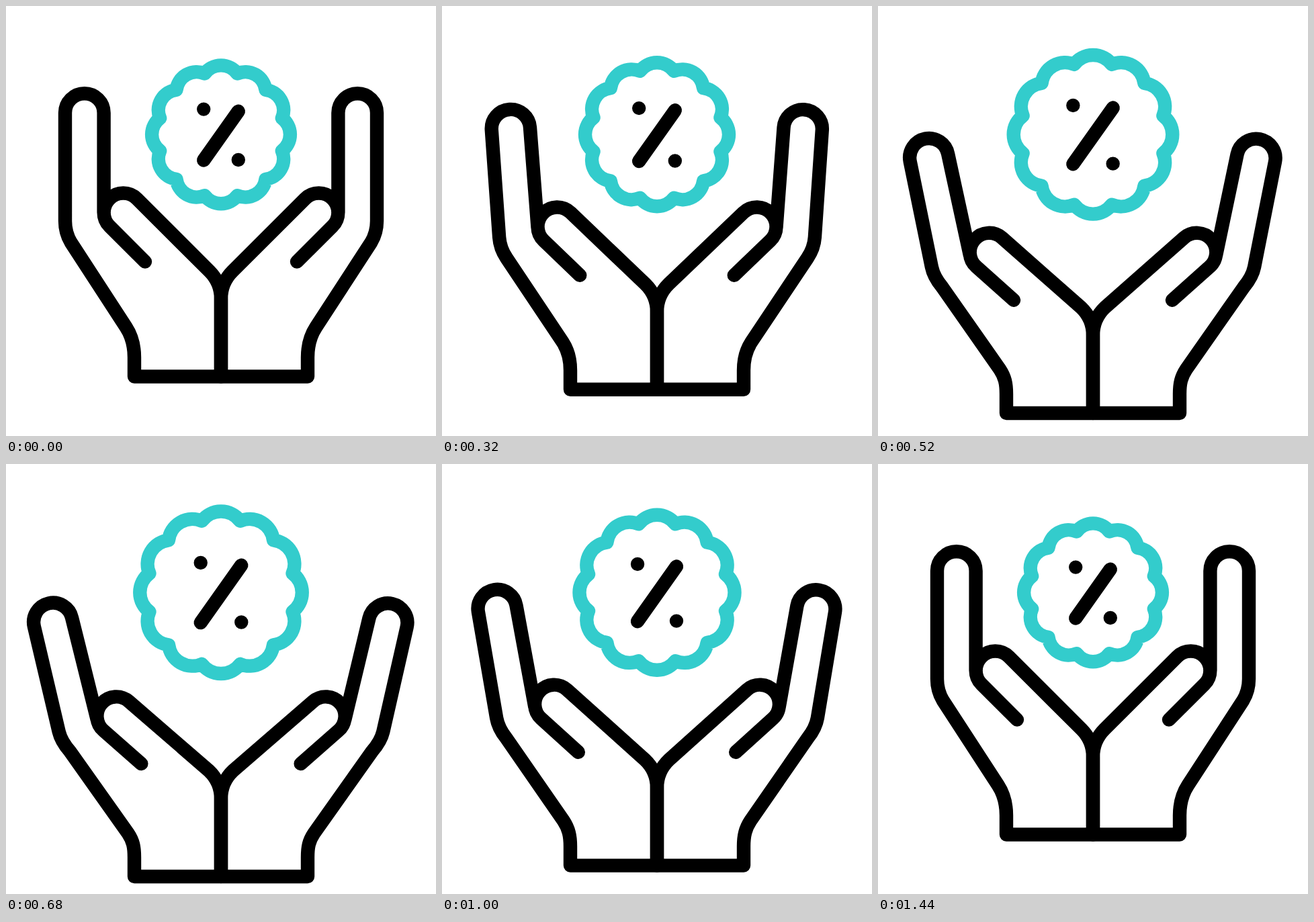
Animation, 640 px wide and 640 px high, one loop 1.52 s. Source, as an HTML page:

```html
<!DOCTYPE html>
<html lang="en">
<head>
<meta charset="utf-8">
<title>Hands and discount badge</title>
<style>
  html, body { margin: 0; width: 100%; height: 100%; overflow: hidden; background: #fff; }
  svg { display: block; width: 100%; height: 100%; }
  path { fill: none; stroke: #000; stroke-width: 20.4; stroke-linecap: round; stroke-linejoin: round; }
  #badge { stroke: #3cc; }
</style>
</head>
<body>
<svg viewBox="0 0 640 640">
  <path id="left"/>
  <path id="right" transform="matrix(-1 0 0 1 640 0)"/>
  <path id="badge"/>
  <path id="percent"/>
</svg>
<script>
const LOOP = 1520, STEP = 40, PEAK = 720;
const CX = 320, CY = 191.3;
const SEMICIRCLE = 'A1 1 0 0 1 ';

// Symmetric ease-in-out: cubic-bezier(h, 0, 1 - h, 1)
function ease(x, h) {
  if (x <= 0) return 0;
  if (x >= 1) return 1;
  let lo = 0, hi = 1;
  for (let i = 0; i < 24; i++) {
    const s = (lo + hi) / 2, r = 1 - s;
    if (3 * h * s * r * r + 3 * (1 - h) * s * s * r + s ** 3 < x) lo = s; else hi = s;
  }
  return lo * lo * (3 - 2 * lo);
}

// Rises from start to the peak, then falls back until end.
const swell = (t, start, end, h) =>
  ease(t < PEAK ? (t - start) / (PEAK - start) : (end - t) / (end - PEAK), h);

// Each point is its resting place plus its full travel; lean adjusts the fingertip.
function hand(k, lean) {
  const p = (x, y, dx, dy) => `${x + dx * k} ${y + dy * k} `;
  return 'M' + p(320, 551.5, 0, 62.7) +
    'L' + p(191, 551.5, 0, 62.7) +
    'L' + p(191, 523, 0, 62.7) +
    'C' + p(191, 507, 0, 63) + p(186.7, 490.3, 2.5, 71) + p(178.6, 477.9, 3, 72) +
    'L' + p(96.6, 351.9, -1.5, 76) +
    'C' + p(91, 342.5, -2.8, 77.5) + p(88, 331, -6.8, 78.5) + p(88, 320, -9.3, 78.8) +
    'L' + p(88, 159, -46.3 + lean, 83.3 + lean / 2) +
    SEMICIRCLE + p(145.6, 159, -47.7 + lean, 70.2 + lean / 2) +
    'L' + p(145.6, 307.4, -10, 73) +
    'M' + p(207, 380.6, -5.7, 65.7) +
    'L' + p(154.1, 327.8, -8.8, 69.4) +
    SEMICIRCLE + p(194.9, 287, -11.9, 66.7) +
    'L' + p(303, 394.9, -1, 61.8) +
    'C' + p(314, 406, -1, 61) + p(320, 420, 0, 62) + p(320, 436, 0, 62.7) +
    'L' + p(320, 551.5, 0, 62.7);
}

// Twelve lobes meeting in cusps.
function badge(scale) {
  const r = 94 * scale, lobe = 30.5 * scale;
  const cusps = Array.from({ length: 13 }, (_, i) => {
    const a = (i * 30 + 15) * Math.PI / 180;
    return `${CX + r * Math.cos(a)} ${CY + r * Math.sin(a)}`;
  });
  return 'M' + cusps.join(`A${lobe} ${lobe} 0 0 1 `) + 'Z';
}

function percent(scale) {
  const p = (x, y) => `${CX + x * scale} ${CY + y * scale}`;
  return `M${p(-25.8, -37.7)}h.01M${p(25.8, 37.7)}h.01M${p(-25.8, 38.2)}L${p(25.8, -34.6)}`;
}

const draw = (id, d) => document.getElementById(id).setAttribute('d', d);

function render(now) {
  const t = Math.floor(now % LOOP / STEP) * STEP;
  const open = swell(t, 40, 1440, .57);
  const scale = 1 + .174 * swell(t, 80, 1400, .6);
  draw('left', hand(open, 0));
  draw('right', hand(open, 1.5));
  draw('badge', badge(scale));
  draw('percent', percent(scale));
}

const began = performance.now();
function tick() {
  render(performance.now() - began);
  requestAnimationFrame(tick);
}
tick();
</script>
</body>
</html>
```
